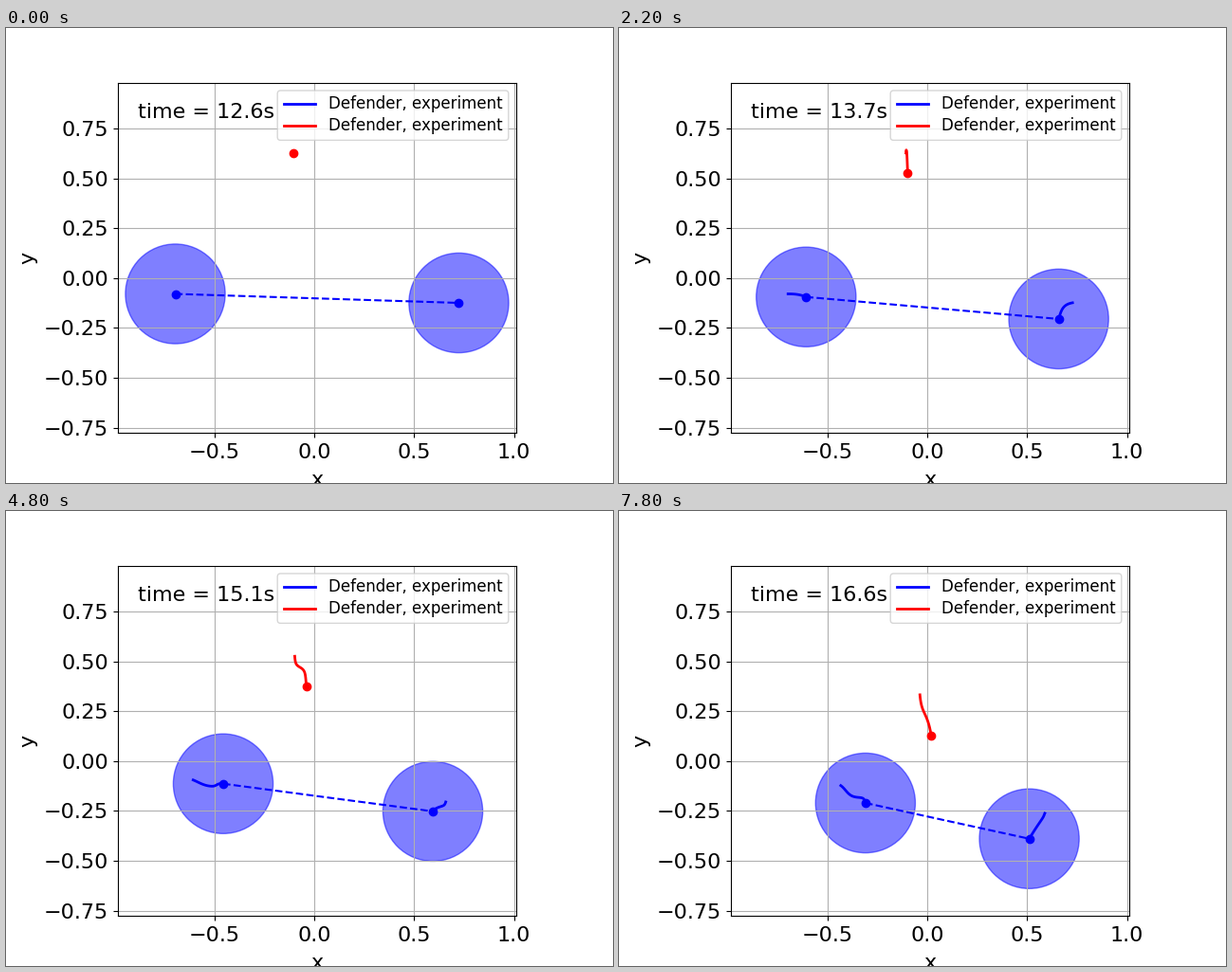
These frames come from a looping animation (640 px wide and 480 px high, 8 s). A matplotlib script:

```python
import numpy as np
import matplotlib.pyplot as plt
from matplotlib.animation import FuncAnimation
from matplotlib.patches import FancyBboxPatch

W, H, DPI = 640, 480, 100
FRAMES, INTERVAL = 40, 200
TAIL = 13                               # trail length in frames
SCALE, X0, Y0 = 210.4, 325.2, 263.85    # pixels per unit, pixel of the origin
LEFT, RIGHT, TOP, BOTTOM = 118, 538, 57.6, 427.2


def drift(t, start, *steps):
    """Sum of soft steps, each given as (centre, width, size)."""
    return start + sum(size / (1 + np.exp((mid - t) / width))
                       for mid, width, size in steps)


# Paths in stage pixels; t is the frame number
def left_path(t):
    return (drift(t, 178, (11.5, 2.6, 42), (28.5, 3.6, 42)),
            drift(t, 280.5, (12, 1.3, 10.2), (20, 1, -3.5), (27.8, 1.1, 15), (38.6, 1.2, 10)))


def right_path(t):
    return (drift(t, 478.6, (5, 2, -15), (19, 2.6, -15.5), (36, 2, -19)),
            drift(t, 289.8, (8.4, 1.8, 21), (24, 3, 12), (36.3, 2, 29)))


def red_path(t):
    return (drift(t, 302.6, (6, 2, 1.5), (16.5, 1.7, 12), (33.3, 3, 15)),
            drift(t, 132, (1.5, 0.7, -4.5), (9.5, 1.7, 36), (24.5, 2.6, 46), (37.5, 3, 44)))


plt.rcParams.update({"font.family": "DejaVu Sans", "font.size": 16})
fig = plt.figure(figsize=(W / DPI, H / DPI), dpi=DPI)
ax = fig.add_axes([LEFT / W, 1 - BOTTOM / H, (RIGHT - LEFT) / W, (BOTTOM - TOP) / H])
ax.set_xlim((LEFT - X0) / SCALE, (RIGHT - X0) / SCALE)
ax.set_ylim((Y0 - BOTTOM) / SCALE, (Y0 - TOP) / SCALE)
ax.set_xticks(np.arange(-0.5, 1.01, 0.5))
ax.set_yticks(np.arange(-0.75, 0.76, 0.25))
ax.tick_params(axis="x", pad=4.3)
ax.set_xlabel("x", labelpad=6.4)
ax.set_ylabel("y", labelpad=4.5)
ax.grid(True)

clock = ax.text(0.05, 0.9, "", transform=ax.transAxes)
link, = ax.plot([], [], "b--", lw=1.5)


class Agent:
    def __init__(self, path, color, radius=0):
        self.path = path
        self.trail, = ax.plot([], [], color=color, lw=2)
        self.dot, = ax.plot([], [], "o", color=color)
        self.disc = None
        if radius:
            self.disc = ax.add_patch(plt.Circle((0, 0), radius, color=color, alpha=0.5))

    def move(self, n):
        px, py = self.path(np.linspace(n - TAIL, n, 4 * TAIL + 1))
        x, y = (px - X0) / SCALE, (Y0 - py) / SCALE
        self.trail.set_data(x, y)
        self.dot.set_data(x[-1:], y[-1:])
        if self.disc:
            self.disc.center = x[-1], y[-1]
        return x[-1], y[-1]


def draw_legend(x, y, w, h):
    """Legend box with its top left corner at a stage pixel."""
    top = fig.add_axes([0, 0, 1, 1])
    top.set(xlim=(0, W), ylim=(H, 0))
    top.axis("off")
    top.add_patch(FancyBboxPatch((x, y), w, h, boxstyle="round,pad=0,rounding_size=3.3",
                                 fc="white", ec="0.8", lw=1, alpha=0.8))
    for row, color in enumerate("br"):
        mid = y + 13.5 + 23 * row
        top.plot([x + 6.7, x + 40], [mid, mid], color=color, lw=2)
        top.text(x + 53.3, mid + 5.8, "Defender, experiment", fontsize=12)


left = Agent(left_path, "b", 0.25)
right = Agent(right_path, "b", 0.25)
red = Agent(red_path, "r")
draw_legend(286.2, 66, 243.6, 52.4)


def update(n):
    a, b = left.move(n), right.move(n)
    red.move(n)
    link.set_data([a[0], b[0]], [a[1], b[1]])
    clock.set_text(f"time = {12.62 + 0.1015 * n:.1f}s")
    return []


anim = FuncAnimation(fig, update, frames=FRAMES, interval=INTERVAL,
                     repeat=True, repeat_delay=0)
plt.show()
```
